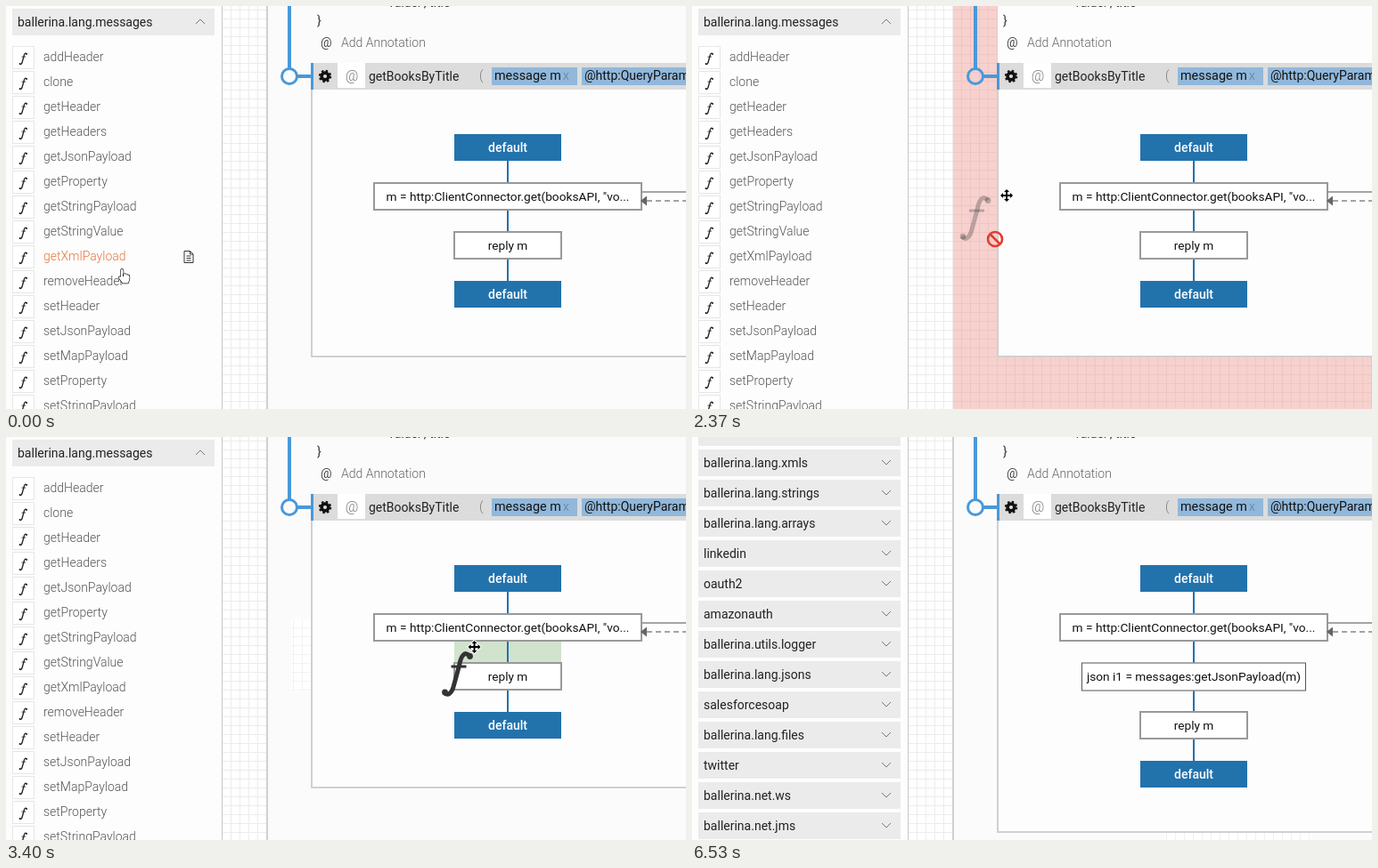
These frames come from a looping animation (763 px wide and 453 px high, 7140 ms). An HTML page with a canvas:

```html
<!DOCTYPE html>
<html lang="en">
<head>
<meta charset="utf-8">
<title>Dragging a function into a worker</title>
<style>
  html, body { margin: 0; width: 100%; height: 100%; overflow: hidden; background: #fff; }
  canvas { display: block; }
</style>
</head>
<body>
<canvas width="763" height="453"></canvas>
<script>
const ctx = document.querySelector('canvas').getContext('2d');
const W = 763, H = 453, LOOP = 7140, DROP = 5190;
const BLUE = '#2272ac', RAIL = '#4a98d9', BORDER = '#d0d0d0';

const functions = ['addHeader', 'clone', 'getHeader', 'getHeaders', 'getJsonPayload', 'getProperty',
  'getStringPayload', 'getStringValue', 'getXmlPayload', 'removeHeader', 'setHeader',
  'setJsonPayload', 'setMapPayload', 'setProperty', 'setStringPayload'];
const packages = ['', 'ballerina.lang.xmls', 'ballerina.lang.strings', 'ballerina.lang.arrays', 'linkedin',
  'oauth2', 'amazonauth', 'ballerina.utils.logger', 'ballerina.lang.jsons', 'salesforcesoap',
  'ballerina.lang.files', 'twitter', 'ballerina.net.ws', 'ballerina.net.jms'];

const bursts = [[150, 880, 6], [2080, 3110, 8], [3250, 4290, 8], [5190, 5190, 1], [6090, 6530, 4]];

// Paths as [time, x, y]
const pointerPath = [[0, 130, 296], [880, 113, 165], [2079, 113, 165], [2080, 175, 182], [2227, 285, 200],
  [2374, 353, 213], [2521, 378, 226], [2668, 430, 232], [2816, 473, 234], [3110, 516, 236],
  [4290, 555, 236], [5189, 555, 236], [5190, 554, 233], [6089, 554, 233], [6090, 533, 288],
  [6237, 585, 385], [6383, 683, 440]];
const ghostPath = [[2080, 122, 182], [2227, 232, 200], [2374, 300, 213], [2521, 326, 228],
  [2668, 385, 237], [2816, 433, 240], [3110, 478, 241], [4290, 521, 241]];

const shapes = {
  f: new Path2D('M32 5C26-1 22 5 20 16L14 38C12 47 7 51 3 46'),
  bar: new Path2D('M11 17H28'),
  hand: new Path2D('M3 9.5V1.5Q4 0 5.5 1.5V6Q7 5 8 6.5Q10 6 10.5 7.5Q12.5 7 12.5 9V12L11 16.5H5L1 11Q0 8.5 3 9.5Z'),
  move: new Path2D('M0-7L3-4H1V-1H4V-3L7 0L4 3V1H1V4H3L0 7L-3 4H-1V1H-4V3L-7 0L-4-3V-1H-1V-4H-3Z'),
  arrow: new Path2D('M0 0V15L3.5 11.5L6 17L8.5 16L6 10.5H11Z'),
  page: new Path2D('M.5.5H7L10.5 4V13.5H.5ZM7 .5V4H10.5M3 6H8M3 8.5H8M3 11H8')
};

function heldTime(t) {
  let held = 0;
  for (const [start, end, count] of bursts) {
    if (t < start) break;
    const step = (end - start) / (count - 1) || 1;
    held = start + step * Math.min(count - 1, Math.floor((t - start) / step + 0.04));
  }
  return held;
}

function along(path, t) {
  let i = 0;
  while (i < path.length - 2 && t >= path[i + 1][0]) i++;
  const [a, b] = [path[i], path[i + 1]];
  const k = Math.max(0, Math.min(1, (t - a[0]) / (b[0] - a[0])));
  return [a[1] + (b[1] - a[1]) * k, a[2] + (b[2] - a[2]) * k];
}

function rect(x, y, w, h, color) {
  ctx.fillStyle = color;
  ctx.fillRect(x, y, w, h);
}

function frame(x, y, w, h, color, line) {
  ctx.strokeStyle = color;
  ctx.lineWidth = line;
  ctx.strokeRect(x + line / 2, y + line / 2, w - line, h - line);
}

function polyline(points, color, line, dash = []) {
  ctx.strokeStyle = color;
  ctx.lineWidth = line;
  ctx.setLineDash(dash);
  ctx.beginPath();
  for (const [x, y] of points) ctx.lineTo(x, y);
  ctx.stroke();
  ctx.setLineDash([]);
}

function circle(x, y, r, color, line, dash = []) {
  ctx.strokeStyle = color;
  ctx.lineWidth = line;
  ctx.setLineDash(dash);
  ctx.beginPath();
  ctx.arc(x, y, r, 0, 7);
  ctx.stroke();
  ctx.setLineDash([]);
}

function text(str, x, y, color = '#111', { size = 14, weight = 400, align = 'left' } = {}) {
  ctx.font = `${weight} ${size}px Roboto, sans-serif`;
  ctx.textAlign = align;
  ctx.fillStyle = color;
  ctx.fillText(str, x, y);
}

function grid(x, y, w, h, fill, line) {
  rect(x, y, w, h, fill);
  for (let gx = Math.ceil((x - 2) / 10) * 10 + 2; gx < x + w; gx += 10) rect(gx, y, 1, h, line);
  for (let gy = Math.ceil((y - 4) / 10) * 10 + 4; gy < y + h; gy += 10) rect(x, gy, w, 1, line);
}

function at(x, y, scale, draw) {
  ctx.save();
  ctx.translate(x, y);
  ctx.scale(scale, scale);
  draw();
  ctx.restore();
}

function functionGlyph(x, y, scale, color) {
  at(x, y, scale, () => {
    ctx.strokeStyle = ctx.fillStyle = color;
    ctx.lineWidth = 5;
    ctx.stroke(shapes.f);
    ctx.lineWidth = 3;
    ctx.stroke(shapes.bar);
    for (const [cx, cy] of [[32, 5.5], [4, 46]]) {
      ctx.beginPath();
      ctx.arc(cx, cy, 3.4, 0, 7);
      ctx.fill();
    }
  });
}

function pointer(kind, x, y) {
  const light = kind === 'hand';
  at(x, y, 1, () => {
    ctx.lineJoin = 'round';
    ctx.lineWidth = light ? 1.3 : 2;
    ctx.strokeStyle = light ? '#111' : '#fff';
    ctx.fillStyle = light ? '#fff' : '#000';
    ctx.stroke(shapes[kind]);
    ctx.fill(shapes[kind]);
    if (light) polyline([[5.5, 9], [5.5, 6]], '#111', 1);
  });
}

function sectionHeader(label, y, up) {
  rect(7, y, 227, 30, '#ebebeb');
  text(label, 13, y + 20, '#222');
  const d = up ? -2.5 : 2.5;
  polyline([[213, y + 14.5 - d], [218, y + 14.5 + d], [223, y + 14.5 - d]], '#777', 1);
}

function functionList(t, pointerY) {
  sectionHeader('ballerina.lang.messages', 3, true);
  const hovered = t < 2080 ? Math.floor((pointerY - 45) / 28 + 0.14 - 0.18) : -1;
  functions.forEach((name, i) => {
    const y = 57 + 28 * i, active = i === hovered;
    if (active && t >= 150) rect(32, y - 12, 198, 25, '#f0f0f0');
    rect(7, y - 12, 25, 26, '#fff');
    frame(7, y - 12, 25, 26, '#e6e6e6', 1);
    functionGlyph(14.5, y - 4.5, 0.27, '#222');
    text(name, 42, y + 5, active ? '#e8743b' : '#555', { weight: 300 });
    if (active) at(199.5, y - 6, 1, () => {
      ctx.strokeStyle = '#333';
      ctx.lineWidth = 1;
      ctx.stroke(shapes.page);
    });
  });
}

function sidebar(t, pointerY) {
  rect(0, 0, 242, H, '#fdfdfd');
  if (t < DROP) functionList(t, pointerY);
  else packages.forEach((name, i) => sectionHeader(name, 34 * i - 20, false));
  rect(242, 0, 1, H, '#c8c8c8');
}

function resourceHeader() {
  text('value: , title', 429, 1, '#333');
  text('}', 349, 21, '#333');
  text('@', 353, 46, '#444');
  text('Add Annotation', 376, 46, '#666', { weight: 300 });

  rect(343, 64, W, 30, '#dcdcdc');
  rect(342, 64, 3, 30, RAIL);
  rect(372, 64, 31, 28, '#fff');
  circle(358, 79, 3.9, '#111', 3.6);
  circle(358, 79, 6, '#111', 2.4, [2.36, 2.36]);
  text('@', 388, 84, '#777', { size: 16, weight: 300, align: 'center' });
  text('getBooksByTitle', 407, 84, '#222');
  text('(', 531, 83, '#777', { weight: 300 });
  rect(545, 69, 96, 20, '#91b8db');
  text('message m', 548, 83, '#111', { size: 14.4 });
  text('x', 625, 83, '#5b7f9f', { weight: 300 });
  rect(646, 69, W, 20, '#91b8db');
  text('@http:QueryParam', 649, 83);

  polyline([[318, 0], [318, 70]], RAIL, 4);
  polyline([[327, 79], [343, 79]], RAIL, 4);
  circle(318, 79, 8.5, RAIL, 3);
}

function terminal(y) {
  rect(503, y, 120, 30, BLUE);
  text('default', 563, y + 20, '#fff', { weight: 500, align: 'center' });
}

function statement(label, x, y, w, color = '#999', line = 2) {
  rect(x, y, w, 32, '#fff');
  frame(x, y, w, 32, color, line);
  text(label, x + w / 2, y + 20.5, '#111', { size: 13.7, align: 'center' });
}

function worker(t) {
  const dropped = t >= DROP, shift = dropped ? 55 : 0;
  if (t >= 2660 && t < 3100) grid(393, 174, 340, 135, '#d1e3cd', '#c9dcc6');
  if (t >= 3250 && !dropped) rect(503, 229, 120, 25, '#d1e3cd');
  rect(562, 170, 2, 145 + shift, BLUE);
  terminal(144);
  statement('m = http:ClientConnector.get(booksAPI, "vo...', 412, 198, 302);
  if (dropped) statement('json i1 = messages:getJsonPayload(m)', 437, 253.5, 252, '#555', 1);
  statement('reply m', 502, 253 + shift, 122);
  terminal(309 + shift);

  polyline([[714, 209], [W, 209]], '#888', 1.4);
  polyline([[719, 219], [W, 219]], '#888', 1.4, [6, 4]);
  ctx.fillStyle = '#666';
  ctx.fill(new Path2D('M712 219L719 213.5V224.5Z'));
}

function design(t) {
  const bottom = t >= DROP ? 444 : 394;
  grid(243, 0, 50, H, '#fff', '#ececec');
  rect(293, 0, W, H, '#fbfbfb');
  if (t >= 2220 && t < 2660) {
    grid(293, 0, W - 293, H, '#f6d1ce', '#eec5c2');
    rect(343, 0, W, 94, '#fdfdfd');
  } else {
    rect(292, 0, 2, H, BORDER);
  }
  if (t >= 2660 && t < DROP) grid(320, 205, 23, 82, '#fff', '#f3f3f3');
  if (t >= 6380) grid(530, 445, 165, 8, '#fff', '#f0f0f0');
  rect(343, 94, W, bottom - 94, '#fdfdfd');
  frame(342, 90, W, bottom - 89, BORDER, 2);
  resourceHeader();
  worker(t);
}

function ghost(t) {
  const [x, y] = along(ghostPath, t), denied = t < 2660;
  ctx.globalAlpha = denied ? 0.3 : 1;
  functionGlyph(x, y, 1, '#333');
  ctx.globalAlpha = 1;
  if (denied) {
    const [cx, cy] = [x + 40, y + 49];
    circle(cx, cy, 8, '#e23b30', 2.6);
    polyline([[cx - 5.5, cy - 5.5], [cx + 5.5, cy + 5.5]], '#e23b30', 2.6);
  }
}

function render(time) {
  const t = heldTime(time);
  const [x, y] = along(pointerPath, t);
  design(t);
  sidebar(t, y);
  if (t < 2080) pointer('hand', x - 4, y - 1);
  else if (t < DROP) {
    ghost(t);
    pointer('move', x, y);
  } else if (t < 6500) pointer('arrow', x, y);
}

const begin = performance.now();
function tick() {
  render((performance.now() - begin) % LOOP);
  requestAnimationFrame(tick);
}
tick();
</script>
</body>
</html>
```
